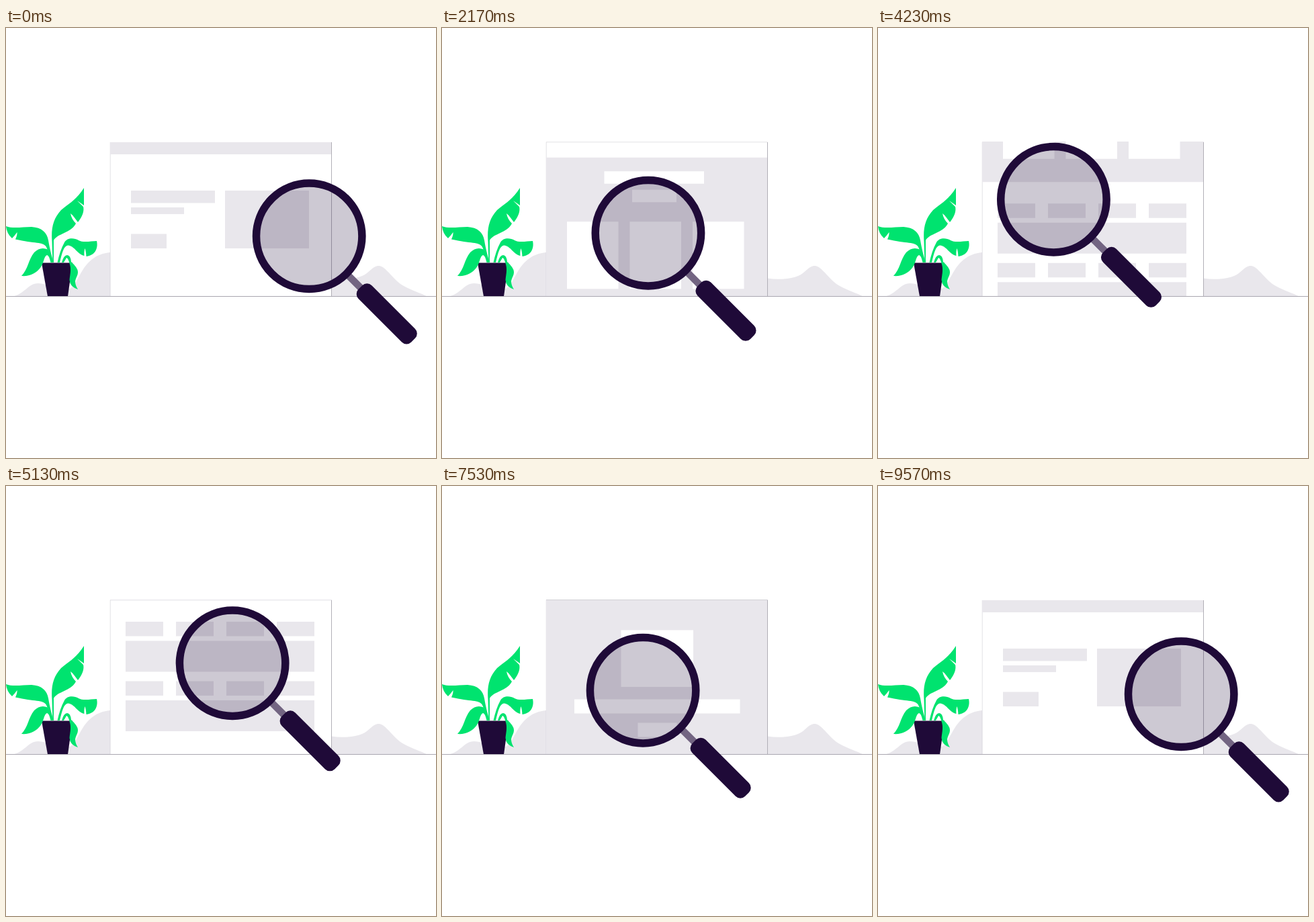
An HTML page that plays this animation: 640 px wide and 640 px high, repeating every 9610 ms.

```html
<!DOCTYPE html>
<html lang="en">
<head>
<meta charset="utf-8">
<title>Page search</title>
<style>
  html, body { margin: 0; width: 100%; height: 100%; overflow: hidden; background: #fff; }
  svg { display: block; width: 100%; height: 100%; --pale: #e9e7ec; --dark: #1f0a38; }
  .pale { fill: var(--pale); }
  .white { fill: #fff; }
  .dark { fill: var(--dark); }
  .green { fill: #00e36f; }
  .line { fill: none; stroke: #aaa7b0; }
  .cells { stroke: var(--pale); stroke-width: 21.5; stroke-dasharray: 56 19; }
  .tiles { stroke: #fff; stroke-width: 100; stroke-dasharray: 76.5 17; }
</style>
</head>
<body>
<svg viewBox="0 0 640 640">
  <defs>
    <clipPath id="window"><rect x="155" y="169" width="330" height="231"/></clipPath>

    <g id="hero">
      <path class="white" d="M155 169h330v1h-330z"/>
      <path class="pale" d="M155 170h330v18h-330zM186 242h125v18.5h-125zM186 267h79v10h-79zM186 306.5h53v21.5h-53zM326 242h125v86h-125z"/>
    </g>

    <g id="cards">
      <path class="pale" d="M155 170h330v230h-330z"/>
      <path class="white" d="M241.5 190.5h148.5v18.5h-148.5zM283 218h66v18.5h-66z"/>
      <path class="tiles" d="M186 315.5h263.5"/>
    </g>

    <g id="row">
      <path class="cells" d="M178 212.7h281"/>
      <path class="pale" d="M178 230.5h281v46h-281z"/>
    </g>
    <g id="rows">
      <use href="#row"/>
      <use href="#row" y="88.5"/>
      <path class="line" stroke-width=".8" d="M155 400h330"/>
    </g>

    <g id="article">
      <path class="pale" d="M155 170h330v230h-330z"/>
      <path class="white" d="M266.5 214.5h107.5v84.5h-107.5zM197 317.5h246.5v21h-246.5zM291.5 352.5h58v21h-58z"/>
    </g>
  </defs>

  <path class="pale" d="M8 400C28 397 32 380 48 380S80 395 95 388S112 338 155 334V400Z"/>
  <path class="pale" d="M484 372.5C500 375 518 374 530 369S545 354 555 354S577 376 592 384S616 394 628 400H484Z"/>

  <path class="line" stroke-width=".35" d="M155.2 400V169.8H484.5"/>
  <g id="pages" clip-path="url(#window)"></g>
  <path class="line" stroke-width=".9" d="M484.5 170V400"/>

  <path class="dark" d="M53 349.5H99L92 399.5H62Z"/>
  <g class="green">
    <path d="M116 238V264L106 257L115 266C117 274 112 283 107 289C103 284 100 279 96 276C97 282 100 287 104 291C97 305 76 306 71 316V349H69.5L68.5 318C67 298 70 284 82 271C92 262 103 258 116 238Z"/>
    <path d="M0 295C10 299 25 296 38 296C53 297 61 304 63 316S68 340 71 349H68C65 340 63 332 60 326C56 318 42 321 14 314.500Q17 308 16.500 304Q13 309 9 313Q1 306 0 295Z"/>
    <path d="M23 369C33 359 33 345 42 334Q51 325 62 329.500Q66 338 68.500 349H66.500Q64 338 61 338C56 340 57 349 51 357S35 370 23 369Z"/>
    <path d="M76.500 349C79 338 82 328 87 319C91 312 101 312 108 316S127 317 135 317C137 325 135 338 119.500 340Q119 332 117.500 328Q116 332 116.500 339C106 337 102 324 92 323.500C85 325 83 338 80 349Z"/>
    <path d="M83 349Q86 338 91 338T97 348Q107 357 107 363C107 369 104 371 103 377Q103 383 107 389Q95 385 94.500 375C95 369 97 361 95.500 354S92 342 90 342T86 349Z"/>
  </g>
  <path class="line" d="M0 399.5H640"/>

  <g id="lens">
    <g transform="rotate(45)">
      <rect x="80" y="-5" width="34" height="10.4" fill="#736582"/>
      <rect class="dark" x="107.8" y="-14" width="111.2" height="28" rx="10"/>
    </g>
    <circle r="78.7" class="dark" fill-opacity=".22"/>
    <circle r="78.7" fill="none" stroke="var(--dark)" stroke-width="11.5"/>
  </g>
</svg>
<script>
  const LOOP = 9610, PAGE = 230, SCROLL = 870;
  const HOME = { x: 451.2, y: 309.8 };

  const order = ['hero', 'cards', 'rows', 'article', 'rows', 'hero'];
  const scrollStarts = [1470, 3650, 6050, 7600, 8705];

  // The lens glides through these places
  const stops = [
    { t: 0, ...HOME },
    { t: 970, x: 376.5, y: 298.5 },
    { t: 2170, x: 307, y: 305.2 },
    { t: 3270, x: 251.7, y: 282.7 },
    { t: 4400, x: 268, y: 254 },
    { t: 5130, x: 337, y: 263.7 },
    { t: 5960, x: 429, y: 310 },
    { t: 6930, x: 336, y: 309 },
    { t: 7530, x: 299.2, y: 304.2 },
    { t: 8330, x: 200.5, y: 276 },
    { t: 8770, x: 260.7, y: 283.7 },
    { t: 9575, ...HOME },
    { t: LOOP, ...HOME }
  ];

  const clamp = v => Math.min(1, Math.max(0, v));
  const smooth = s => s * s * (3 - 2 * s);
  const rate = (a, b, axis) => (b[axis] - a[axis]) / (b.t - a.t);

  // Speed at a stop, zero where the direction turns
  function speed(i, axis) {
    const [a, b, c] = [stops[i - 1], stops[i], stops[i + 1]];
    if (!a || !c || rate(a, b, axis) * rate(b, c, axis) <= 0) return 0;
    return rate(a, c, axis);
  }

  function glide(t, axis) {
    const i = stops.findIndex(stop => stop.t > t) - 1;
    const a = stops[i], b = stops[i + 1], span = b.t - a.t;
    const s = (t - a.t) / span;
    const bend = (1 - s) * speed(i, axis) - s * speed(i + 1, axis);
    return a[axis] + (b[axis] - a[axis]) * smooth(s) + span * s * (1 - s) * bend;
  }

  const pages = document.getElementById('pages');
  const lens = document.getElementById('lens');
  pages.innerHTML = '<g>' + order.map((id, i) => `<use href="#${id}" y="${i * PAGE}"/>`).join('') + '</g>';
  const strip = pages.firstChild;
  const start = performance.now();

  function draw() {
    const t = Math.max(0, performance.now() - start) % LOOP;
    const turned = scrollStarts.reduce((sum, from) => sum + smooth(clamp((t - from) / SCROLL)), 0);
    strip.setAttribute('transform', `translate(0 ${-PAGE * turned})`);
    lens.setAttribute('transform', `translate(${glide(t, 'x')} ${glide(t, 'y')})`);
    requestAnimationFrame(draw);
  }
  draw();
</script>
</body>
</html>
```
